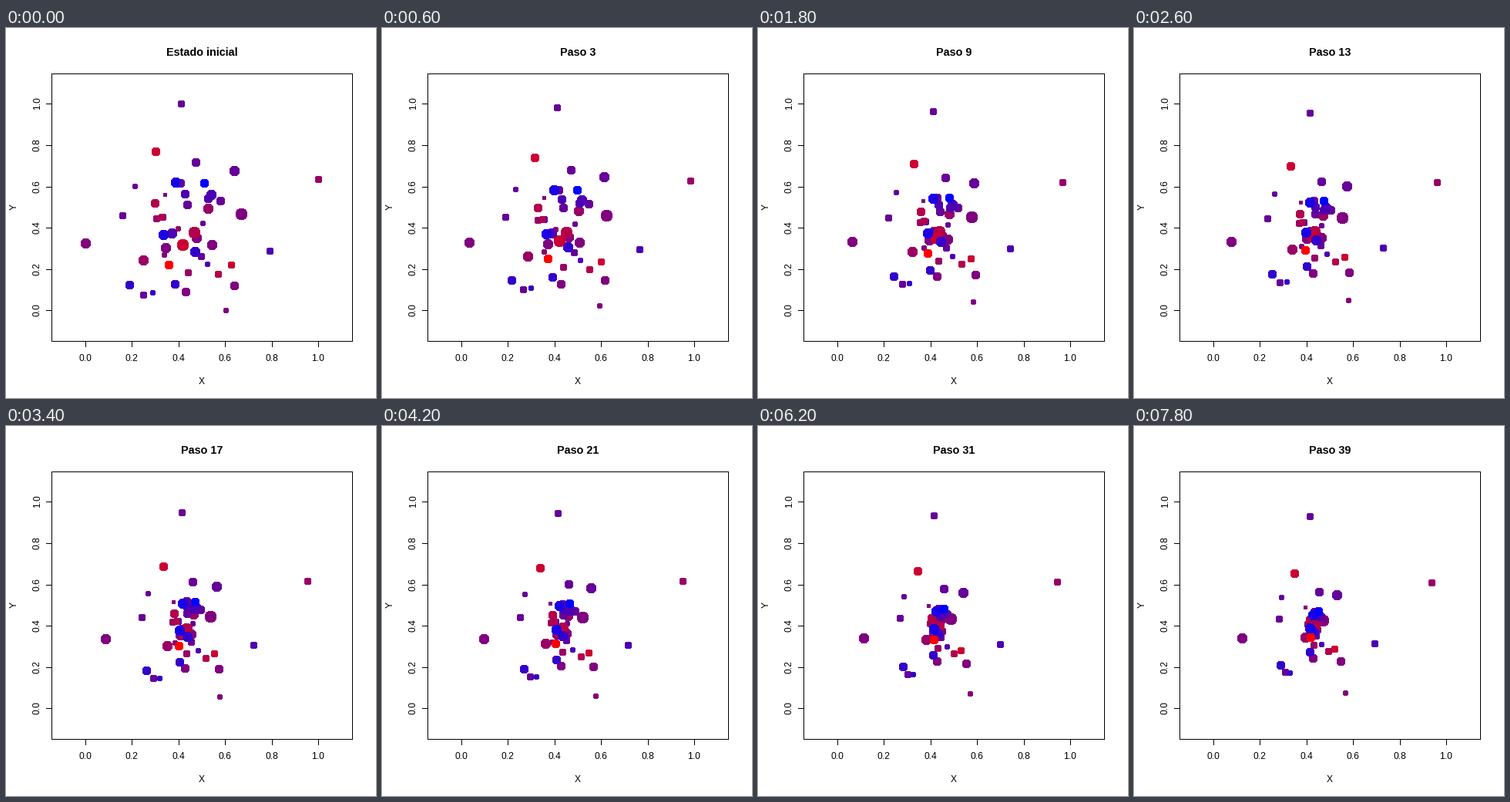
Write a matplotlib script that moves like this. It is 480 by 480 pixels and loops after 8 s.

```python
import numpy as np
import matplotlib.pyplot as plt
from matplotlib.animation import FuncAnimation
from matplotlib.patches import Circle, Rectangle

STEPS = 40
SUBSTEPS = 60
SCALE = np.array([302, 268])  # pixels per data unit
GRAVITY = 0.0135
CORE = 0.025                  # spacing kept inside the core, data units

# Charge 0 (blue) to 10 (red) -> start x, start y, radius; weakest drawn first
PARTICLES = {
    5: [(103, 279, 6), (206, 216, 2), (305, 241, 7), (247, 272, 6),
        (267, 281, 6), (207, 285, 6), (205, 294, 3), (296, 334, 5),
        (285, 366, 3), (233, 342, 5)],
    6: [(405, 196, 4), (195, 247, 4), (262, 234, 6), (223, 260, 3),
        (178, 301, 6), (236, 317, 4)],
    4: [(227, 98, 4), (246, 174, 5), (296, 185, 6), (167, 205, 3),
        (226, 201, 5), (278, 224, 5), (151, 243, 4), (235, 229, 5),
        (255, 253, 3), (253, 296, 4), (178, 346, 4)],
    3: [(232, 215, 5), (266, 216, 6), (262, 221, 5), (203, 245, 4),
        (215, 266, 6), (261, 306, 3), (342, 289, 4)],
    7: [(193, 227, 5), (202, 245, 4), (244, 265, 7), (275, 319, 4)],
    8: [(194, 160, 5), (229, 281, 7), (292, 307, 4)],
    2: [(245, 290, 6), (219, 332, 5), (160, 333, 5), (190, 343, 3)],
    1: [(220, 200, 6), (204, 268, 6)],
    10: [(211, 307, 5)],
    0: [(257, 201, 5)],
}


def elapsed(step):
    """Simulated time: each step is shorter than the one before."""
    return np.log1p(step / 2.2) / np.log1p((STEPS - 1) / 2.2)


def velocity(pos, mass):
    """Attraction falling as 1/d, turning to repulsion inside the core."""
    gap = pos[None] - pos[:, None]
    d2 = (gap ** 2).sum(axis=2)
    factor = mass * (d2 - CORE ** 2) / (d2 + CORE ** 2) ** 2
    pull = (gap * factor[..., None]).sum(axis=1)
    return GRAVITY / mass.sum() * mass[:, None] * pull


def simulate(pos, mass):
    path = [pos]
    for step in range(STEPS - 1):
        dt = (elapsed(step + 1) - elapsed(step)) / SUBSTEPS
        for _ in range(SUBSTEPS):
            pos = pos + dt * velocity(pos, mass)
        path.append(pos)
    return np.array(path)


data = np.array([p for group in PARTICLES.values() for p in group], float)
charges = [c / 10 for c, group in PARTICLES.items() for _ in group]
radii = data[:, 2]
path = simulate(data[:, :2] / SCALE, (radii + 0.5) ** 0.75) * SCALE
path = np.round(path) + 0.5

fig = plt.figure(figsize=(4.8, 4.8), dpi=100, facecolor="white")
ax = fig.add_axes([0, 0, 1, 1])
ax.set_xlim(0, 480)
ax.set_ylim(480, 0)
ax.axis("off")


def label(x, y, text, px=12, **kw):
    return ax.text(x, y, text, fontsize=px * 0.72, family="Liberation Sans",
                   ha="center", va="baseline", rotation_mode="anchor", **kw)


def line(xs, ys):
    ax.plot(xs, ys, color="black", lw=0.72, antialiased=False,
            solid_capstyle="butt")


ax.add_patch(Rectangle((59, 59), 390, 347, fill=False, ec="black", lw=0.72,
                       antialiased=False))
for i in range(6):
    x, y = round(103 + 60.4 * i), round(366.4 - 53.6 * i)
    line([x, x], [406, 413])
    line([52, 59], [y, y])
    label(x, 432.5, f"{i / 5:.1f}")
    label(44, y, f"{i / 5:.1f}", rotation=90)
label(253.5, 462.5, "X")
label(13.5, 232.5, "Y", rotation=90)
title = label(254.5, 36.5, "", 14.4, weight="bold")

dots = [Circle(xy, r + 0.3, color=(c, 0, 1 - c), lw=0, antialiased=False,
               zorder=3)
        for xy, r, c in zip(path[0], radii, charges)]
for dot in dots:
    ax.add_patch(dot)


def draw(step):
    title.set_text(f"Paso {step}" if step else "Estado inicial")
    for dot, xy in zip(dots, path[step]):
        dot.center = tuple(xy)
    return [title, *dots]


def start():
    return draw(0)


anim = FuncAnimation(fig, draw, frames=STEPS, init_func=start, interval=200,
                     repeat=True, repeat_delay=0, blit=False)
plt.show()
```
